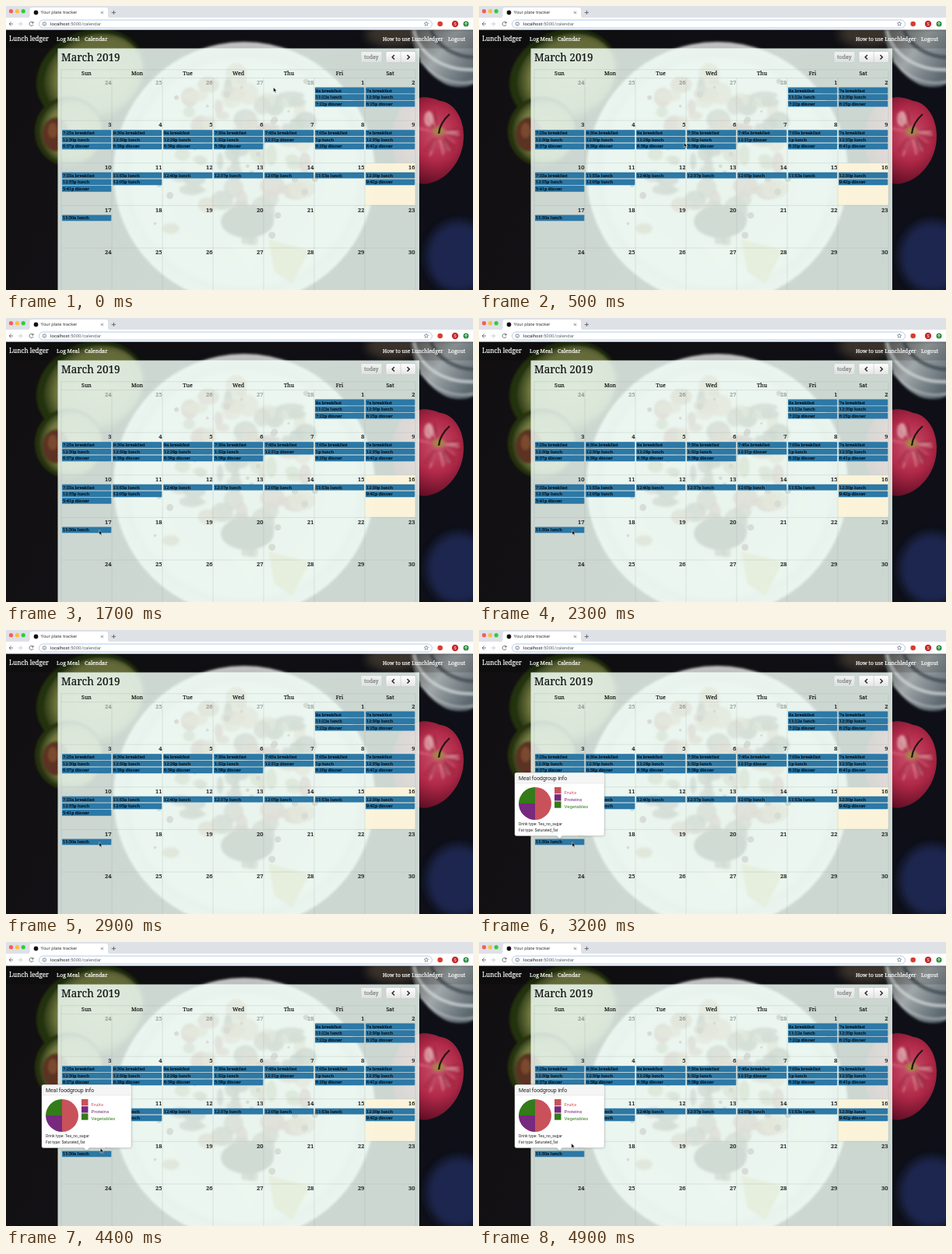
An HTML page that plays this animation: 600x365 px, repeating every 5000 ms.

```html
<!DOCTYPE html>
<html lang="en">
<head>
<meta charset="utf-8">
<title>Calendar</title>
<style>
  html, body { margin: 0; width: 100%; height: 100%; overflow: hidden; background: #111; }
  svg { display: block; width: 600px; height: 365px; }
  text { white-space: pre; }
  .serif { font-family: "Noto Serif", "Liberation Serif", serif; stroke-width: .18px; }
  .sans { font-family: Roboto, "Liberation Sans", sans-serif; stroke-width: 0; }
</style>
</head>
<body>
<svg id="stage" viewBox="0 0 600 365" xmlns="http://www.w3.org/2000/svg">
  <defs>
    <filter id="soft" x="-20%" y="-20%" width="140%" height="140%"><feGaussianBlur stdDeviation="1.5"/></filter>
    <filter id="softer" x="-30%" y="-30%" width="160%" height="160%"><feGaussianBlur stdDeviation="6"/></filter>
    <filter id="shadow" x="-10%" y="-10%" width="120%" height="125%"><feGaussianBlur stdDeviation="1.4"/></filter>
    <linearGradient id="table" x1="0" x2="1" y1="0" y2="0.3">
      <stop offset="0" stop-color="#110f10"/><stop offset=".6" stop-color="#131217"/><stop offset="1" stop-color="#0e0f17"/>
    </linearGradient>
    <radialGradient id="apple" cx=".62" cy=".42" r=".62">
      <stop offset="0" stop-color="#c9506a"/><stop offset=".5" stop-color="#b02948"/><stop offset="1" stop-color="#5a0c22"/>
    </radialGradient>
    <radialGradient id="flesh" cx=".55" cy=".5" r=".55">
      <stop offset="0" stop-color="#8f9156"/><stop offset=".75" stop-color="#737a41"/><stop offset="1" stop-color="#2d3a16"/>
    </radialGradient>
    <radialGradient id="plate">
      <stop offset="0" stop-color="#dcdad3"/><stop offset=".85" stop-color="#ececec"/>
      <stop offset=".9" stop-color="#d3d3d4"/><stop offset="1" stop-color="#e6e6e8"/>
    </radialGradient>
    <linearGradient id="glass" x1="0" x2="1" y1="0" y2=".7">
      <stop offset="0" stop-color="#5b5a57"/><stop offset=".5" stop-color="#a0a7a9"/><stop offset="1" stop-color="#5c6870"/>
    </linearGradient>
    <linearGradient id="button" x1="0" x2="0" y1="0" y2="1">
      <stop offset="0" stop-color="#fff"/><stop offset="1" stop-color="#e3e4e3"/>
    </linearGradient>
  </defs>
  <g id="photo"></g>
  <g id="page"></g>
  <g id="chrome"></g>
  <g id="popover"></g>
  <path id="cursor" d="M0 0V6.1L1.4 4.8L2.4 7L3.5 6.5L2.5 4.4H4.3Z" fill="#0a0a0a" stroke="#fff" stroke-width=".5" stroke-linejoin="round"/>
</svg>
<script>
const LOOP = 5000, STEP = 100, POPOVER_AT = 3100;
const COL_X = 71, COL_W = 65, ROW_Y = 92.6, ROW_H = 54.6;
const $ = id => document.getElementById(id);

const rect = (x, y, w, h, fill, more = "") =>
  `<rect x="${x}" y="${y}" width="${w}" height="${h}" fill="${fill}" ${more}/>`;
const oval = (x, y, rx, ry, fill, more = "") =>
  `<ellipse cx="${x}" cy="${y}" rx="${rx}" ry="${ry}" fill="${fill}" ${more}/>`;
const dot = (x, y, r, fill) => oval(x, y, r, r, fill);
const path = (d, fill, more = "") => `<path d="${d}" fill="${fill}" ${more}/>`;
const line = (d, color, width, more = "") =>
  path(d, "none", `stroke="${color}" stroke-width="${width}" ${more}`);
const text = (face, x, y, size, str, fill = "#101010", more = "") =>
  `<text class="${face}" x="${x}" y="${y}" font-size="${size}" fill="${fill}" stroke="${fill}" ${more}>${str}</text>`;
const END = 'text-anchor="end"', MID = 'text-anchor="middle"';

function random(seed) {
  return () => (seed = (seed * 16807) % 2147483647) / 2147483647;
}

function drawFruit() {
  const tilt = (a, x, y) => `transform="rotate(${a} ${x} ${y})"`;
  return '<g filter="url(#soft)">'
    + oval(109, 90, 72, 58, "#24300f", tilt(-24, 109, 90))
    + oval(112, 90, 65, 52, "url(#flesh)", tilt(-24, 112, 90))
    + oval(81, 161, 44, 45, "#27330f")
    + oval(83, 161, 40, 41, "url(#flesh)")
    + oval(64, 165, 17, 22, "#5b3320")
    + oval(60, 160, 6, 10, "#7a4a2d")
    + '</g>';
}

function drawGlass() {
  return '<g filter="url(#softer)">'
    + oval(498, 36, 36, 17, "#423a33")
    + oval(582, 322, 42, 46, "#1a2750")
    + '</g><g filter="url(#soft)">'
    + path("M520 30C522 58 538 88 566 101C580 106 592 105 602 100V30Z", "url(#glass)")
    + line("M524 31C531 62 560 83 602 82", "#d4dadb", 3.5, 'opacity=".8"')
    + line("M546 31C554 52 576 65 602 66", "#3c464d", 5, 'opacity=".75"')
    + line("M532 70C550 93 577 103 602 97", "#c3cacc", 2, 'opacity=".7"')
    + '</g>';
}

function drawApple(rnd) {
  let s = path("M528 119C538 115 550 119 558 122C575 124 588 143 588 167C588 199 565 227 537 229C505 226 493 190 496 162C499 139 511 121 528 119Z", "url(#apple)");
  s += '<g filter="url(#soft)">';
  const shades = ["#e4a0a5", "#d4687c", "#741028", "#96203c"];
  for (let i = 0; i < 26; i++) {
    const a = rnd() * Math.PI * 2, r = 16 + rnd() * 8;
    const at = k => `${(555 + Math.cos(a) * k * .9).toFixed(1)} ${(162 + Math.sin(a) * k).toFixed(1)}`;
    s += line(`M${at(r * .5)}L${at(r + 9)}`, shades[i % 4], 2.2, 'opacity=".6"');
  }
  s += oval(543, 145, 6, 10, "#e9bfc0", 'opacity=".65"')
    + oval(556, 161, 8, 6, "#a5804a") + '</g>';
  return s + line("M556 164C557 154 562 146 570 139", "#21160f", 2.2);
}

function drawPlate(rnd) {
  let s = oval(306, 214, 168, 168, "url(#plate)", 'filter="url(#soft)"');
  s += '<g filter="url(#soft)">';
  const tones = ["#5e4431", "#2a2822", "#9a5a38", "#77753f", "#b88a5c", "#403629", "#8d3a30"];
  for (let i = 0; i < 75; i++) {
    const a = rnd() * Math.PI * 2, r = Math.sqrt(rnd());
    s += oval(306 + Math.cos(a) * r * 92, 190 + Math.sin(a) * r * 115,
      4 + rnd() * 13, 4 + rnd() * 11, tones[i % tones.length], 'opacity=".8"');
  }
  s += oval(310, 277, 34, 21, "#2b2a25")
    + oval(212, 286, 11, 7, "#a9805b")
    + path("M287 305L333 309L314 344Z", "#f2f0e4")
    + path("M337 300L390 314L368 357L345 342Z", "#c9b061")
    + '</g>';
  for (let i = 0; i < 24; i++) {
    s += dot(185 + rnd() * 225, 95 + rnd() * 200, 1.5 + rnd() * 3, "#5b3a30");
  }
  return s;
}

function drawPhoto() {
  const rnd = random(77);
  $("photo").innerHTML = rect(0, 0, 600, 365, "url(#table)")
    + drawFruit() + drawGlass() + drawApple(rnd) + drawPlate(rnd);
}

const MEALS = [
  [[], [], [], [], [], ["8a breakfast", "11:22a lunch", "7:22p dinner"], ["7a breakfast", "12:30p lunch", "6:25p dinner"]],
  [["7:25a breakfast", "12:30p lunch", "6:37p dinner"], ["8:30a breakfast", "12:30p lunch", "6:38p dinner"],
   ["8a breakfast", "12:29p lunch", "6:38p dinner"], ["7:30a breakfast", "1:32p lunch", "5:39p dinner"],
   ["7:45a breakfast", "12:31p dinner"], ["7:03a breakfast", "1p lunch", "6:20p dinner"],
   ["7a breakfast", "12:35p lunch", "6:41p dinner"]],
  [["7:33a breakfast", "12:35p lunch", "5:41p dinner"], ["11:55a lunch", "12:05p lunch"], ["12:40p lunch"],
   ["12:37p lunch"], ["12:05p lunch"], ["11:53a lunch"], ["12:30p lunch", "9:42p dinner"]],
  [["11:30a lunch"]],
  []
];

function drawPage() {
  let s = rect(0, 30, 600, 24.5, "#000", 'opacity=".15"');
  const nav = (x, str, size = 6.8, more = "") => text("serif", x, 45, size, str, "#fff", more);
  s += nav(4, "Lunch ledger", 8.1) + nav(65, "Log Meal") + nav(101, "Calendar")
    + nav(561.5, "How to use Lunchledger", 6.7, END) + nav(590, "Logout", 6.7, END);

  s += rect(66.5, 54.5, 464.5, 311, "#ecf8f2", 'fill-opacity=".86"');
  s += text("serif", 71, 71, 13.5, "March 2019");

  const edge = 'stroke="#bec5c1" stroke-width=".6"';
  s += '<g opacity=".7">' + rect(456, 58.5, 27, 14.3, "url(#button)", edge + ' rx="2"')
    + text("serif", 469.5, 68, 6.9, "today", "#555", MID) + '</g>'
    + rect(488, 58.5, 38.3, 14.3, "url(#button)", edge + ' rx="2"')
    + line("M507.2 58.5V72.8", "#bec5c1", .6)
    + line("M499 63L496.2 65.7L499 68.4M515.5 63L518.3 65.7L515.5 68.4", "#222", 1.4);

  s += rect(461, 201.8, 65, 54, "#fcf4da", 'fill-opacity=".97"');

  let grid = "M71 81.8H526M71 365V81.8M526 81.8V93";
  for (let r = 0; r < 5; r++) grid += `M71 ${ROW_Y + r * ROW_H}H526`;
  for (let c = 1; c < 8; c++) grid += `M${COL_X + c * COL_W} ${ROW_Y}V365`;
  s += line(grid, "#93a39b", .6, 'opacity=".4"');

  ["Sun", "Mon", "Tue", "Wed", "Thu", "Fri", "Sat"].forEach((d, c) => {
    s += text("serif", COL_X + (c + .5) * COL_W, 89.3, 7, d, "#101010", MID);
  });

  MEALS.forEach((week, r) => {
    const top = ROW_Y + r * ROW_H;
    for (let c = 0; c < 7; c++) {
      const day = r * 7 + c - 4, left = COL_X + c * COL_W;
      s += text("serif", left + 64.5, top + 8.1, 7.6, day < 1 ? day + 28 : day, "#101010",
        END + (day < 1 ? ' opacity=".4"' : ""));
      (week[c] || []).forEach((meal, i) => {
        const mid = top + 15.9 + i * 8.6;
        s += rect(left + 1, mid - 3.9, 63.3, 7.8, "#2c78a6", 'rx=".9"')
          + text("serif", left + 2, mid + 2, 5.6, meal, "#04080c");
      });
    }
  });
  $("page").innerHTML = s;
}

function drawChrome() {
  const icon = (d, width = .9) => line(d, "#5f6368", width);
  let s = rect(0, 0, 600, 15.5, "#dee1e6") + rect(0, 15, 600, 15.5, "#fff")
    + dot(6.5, 6.7, 2.6, "#fc5b57") + dot(14.4, 6.7, 2.6, "#fdbc40") + dot(22.2, 6.7, 2.6, "#34c84a")
    + path("M28 15.2Q30.5 15 30.5 12.5V5Q30.5 2 33.5 2H128Q131 2 131 5V12.5Q131 15 133.5 15.2Z", "#fff")
    + dot(38.5, 8.4, 2.8, "#111")
    + text("sans", 44.5, 10.4, 6, "Your plate tracker", "#3c4043")
    + icon("M121.8 6.8L125 10M125 6.8L121.8 10", .7)
    + icon("M135.7 8.4H141M138.35 5.8V11");

  s += icon("M9 23H4.2M6.6 20.5L4.1 23L6.6 25.5")
    + line("M15.5 23H20.5M18 20.5L20.6 23L18 25.5", "#c2c5c8", .9)
    + icon("M34.8 21.4A2.6 2.6 0 1 0 35.1 24M35.1 20V22H33.1")
    + rect(42.5, 18, 505, 10.2, "#fff", 'rx="5.1" stroke="#adc7e8" stroke-width=".9"')
    + `<circle cx="49.3" cy="23" r="2.3" fill="none" stroke="#5f6368" stroke-width=".7"/>`
    + icon("M49.3 22.7V24.4M49.3 21.4V22", .7)
    + text("sans", 57, 25.1, 6, 'localhost<tspan fill="#5f6368">:5000/calendar</tspan>', "#202124");

  let star = "";
  for (let i = 0; i < 10; i++) {
    const a = i * Math.PI / 5 - Math.PI / 2, r = i % 2 ? 1.25 : 2.9;
    star += (i ? "L" : "M") + (540 + r * Math.cos(a)).toFixed(2) + " " + (23 + r * Math.sin(a)).toFixed(2);
  }
  s += icon(star + "Z", .6) + dot(557.7, 23, 3.3, "#d93c30") + dot(577, 23, 4.2, "#c62828")
    + text("sans", 577, 25, 5.2, "S", "#fff", MID)
    + dot(591, 23, 3.5, "#2c8b3c")
    + line("M591 25V21M589.4 22.6L591 21L592.6 22.6", "#fff", .8)
    + line("M0 30.4H600", "#c8cacc", .5);
  $("chrome").innerHTML = s;
}

function drawPopover() {
  const [red, purple, green] = ["#c9515a", "#76297d", "#347b19"];
  const outline = "M48 183.5H159Q161 183.5 161 185.5V262.5Q161 264.5 159 264.5H107L103.5 268L100 264.5H48Q46 264.5 46 262.5V185.5Q46 183.5 48 183.5Z";
  let s = path(outline, "#000", 'opacity=".3" filter="url(#shadow)"')
    + path(outline, "#fff", 'stroke="#c6c9c7" stroke-width=".5"')
    + path("M46.2 197V185.5Q46.2 183.7 48 183.7H159Q160.8 183.7 160.8 185.5V197Z", "#f5f5f5")
    + line("M46 197H161", "#e3e3e3", .6)
    + text("sans", 51, 192.8, 6.9, "Meal foodgroup info", "#222");

  s += path("M72 202A21 21 0 0 1 72 244Z", red)
    + path("M72 223V244A21 21 0 0 1 51 223Z", purple)
    + path("M72 223H51A21 21 0 0 1 72 202Z", green);
  [["Fruits", red], ["Proteins", purple], ["Vegetables", green]].forEach(([name, color], i) => {
    const y = 202 + i * 9.2;
    s += rect(97, y, 8.5, 8.3, color) + text("sans", 109.5, y + 8.7, 6.2, name, color);
  });
  s += text("sans", 51, 250.6, 5.05, "Drink type: Tea_no_sugar", "#222")
    + text("sans", 51, 259.4, 5.05, "Fat type: Saturated_fat", "#222");
  $("popover").innerHTML = s;
}

// time, x, y of the pointer tip
const MOVES = [
  [0, 343.5, 104.5], [1100, 157.7, 268.7], [1700, 119.7, 272.6],
  [3800, 119.7, 272.6], [4400, 121.2, 264.8], [4900, 118.7, 258.8], [LOOP, 118.7, 258.8]
];

function pointer(t) {
  const i = MOVES.findIndex(m => m[0] > t);
  const [t0, x0, y0] = MOVES[i - 1], [t1, x1, y1] = MOVES[i];
  const p = (t - t0) / (t1 - t0), e = p * p * (3 - 2 * p);
  return [x0 + (x1 - x0) * e, y0 + (y1 - y0) * e];
}

function render(ms) {
  const t = Math.floor((ms % LOOP) / STEP) * STEP;
  const [x, y] = pointer(t);
  $("cursor").setAttribute("transform", `translate(${x.toFixed(2)} ${y.toFixed(2)})`);
  $("popover").setAttribute("visibility", t >= POPOVER_AT ? "visible" : "hidden");
}

drawPhoto();
drawPage();
drawChrome();
drawPopover();
const start = performance.now();
function tick() {
  render(performance.now() - start);
  requestAnimationFrame(tick);
}
tick();
</script>
</body>
</html>
```
